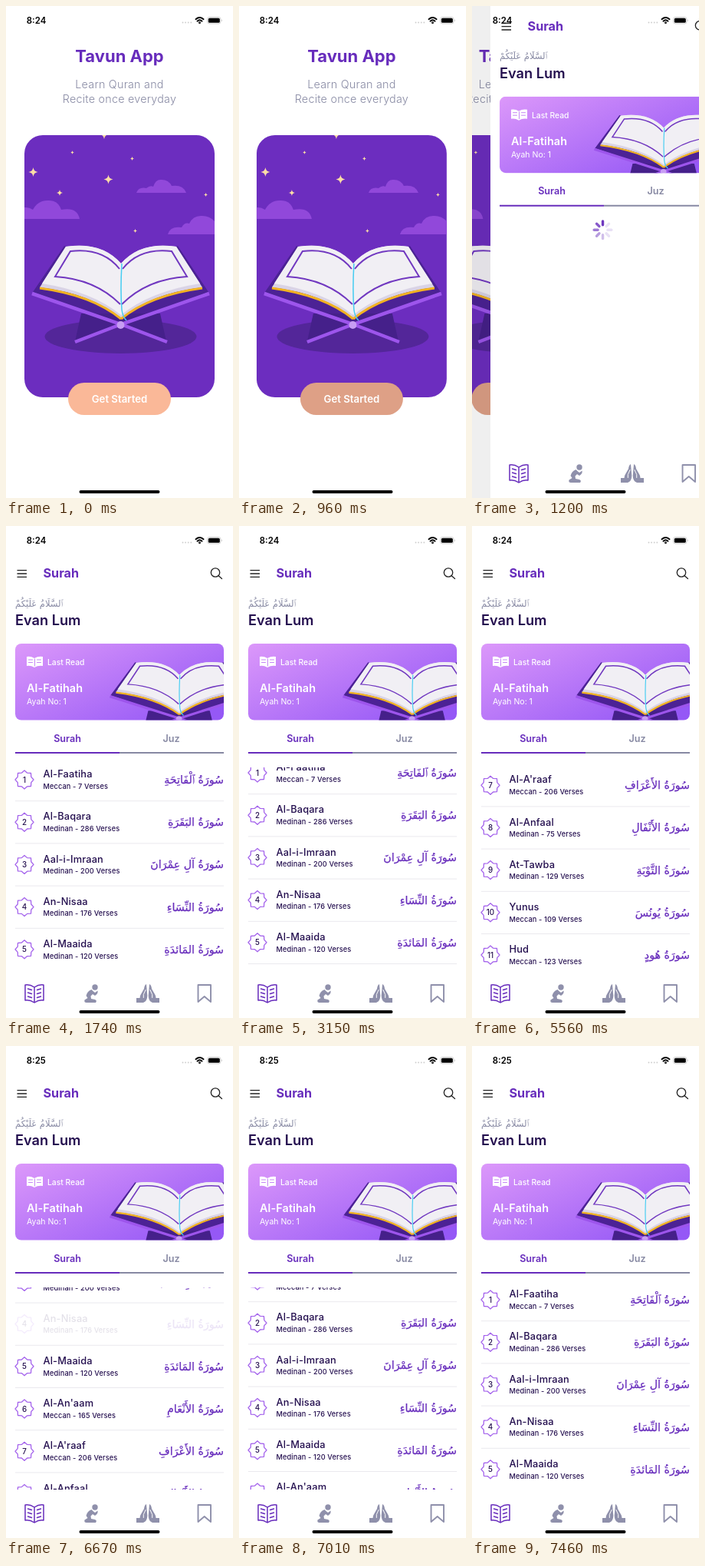
An HTML page that plays this animation: 296x640 px, repeating every 8 s.

```html
<!DOCTYPE html>
<html lang="en">
<head>
<meta charset="utf-8">
<title>Surah reader</title>
<style>
html, body { margin: 0; width: 100%; height: 100%; overflow: hidden; background: #fff; }
svg { display: block; width: 100vw; height: 100vh; }
text { font-family: Inter, "Open Sans", sans-serif; font-weight: 500; fill: #240f4f; }
.ar { font-family: "DejaVu Sans", sans-serif; font-weight: 400; }
.line { fill: none; stroke-linecap: round; stroke-linejoin: round; }
</style>
</head>
<body>
<svg viewBox="0 0 296 640" preserveAspectRatio="none">
  <defs>
    <linearGradient id="lilac" x1="0" y1="0" x2="1" y2=".8">
      <stop offset="0" stop-color="#dc98fa"/><stop offset="1" stop-color="#9558f6"/>
    </linearGradient>
    <clipPath id="posterClip"><rect x="24" y="168" width="248" height="341" rx="24"/></clipPath>
    <clipPath id="bannerClip"><rect x="12" y="153" width="272" height="99.500" rx="8"/></clipPath>
    <clipPath id="listClip"><rect x="0" y="314" width="296" height="263"/></clipPath>
    <g id="half">
      <path d="M78 313Q125 306 150 335V407Q112 374 44 366Z" fill="#d9d3e6"/>
      <path d="M78 313Q125 306 150 335V402Q112 371 47 361Z" fill="#f1eff4"/>
      <path d="M148 342Q126 314 84 319L64 352Q116 355 149 388" fill="none" stroke="#7138c0" stroke-width="2"/>
      <path d="M44 367Q112 376 150 407" fill="none" stroke="#f2b322" stroke-width="3"/>
    </g>
    <g id="book">
      <path d="M35 372L76 312L150 340L224 312L264 372L150 414Z" fill="#4c2295"/>
      <path d="M98 400L90 436L150 414L209 436L201 400Z" fill="#45208a"/>
      <path d="M34 374L150 414L210 437M265 374L150 414L90 437" fill="none" stroke="#9d55ec" stroke-width="4.5"/>
      <use href="#half"/>
      <use href="#half" transform="matrix(-1 0 0 1 300 0)"/>
      <circle cx="149.500" cy="415" r="5" fill="#c79df3"/>
      <path d="M151 335Q149 370 151 395Q152 404 157 409" fill="none" stroke="#45cdf2" stroke-width="1.500"/>
    </g>
    <g id="hand">
      <path d="M183 596Q180.500 597 180 602L176 609Q174.500 611 174.500 614H170V620H179Q184.300 618 184.300 611Z"/>
      <path class="line" d="M182 603.500L179.300 609.500V613.500" stroke="#fff" stroke-width="1"/>
    </g>
  </defs>

  <g id="intro">
    <rect width="296" height="640" fill="#fff"/>
    <text x="148" y="73" font-size="22" text-anchor="middle" style="font-weight:700;fill:#672cbc">Tavun App</text>
    <g font-size="14.300" letter-spacing=".25" text-anchor="middle">
      <text x="148" y="107" style="font-weight:300;fill:#8789a3">Learn Quran and</text>
      <text x="148" y="126" style="font-weight:300;fill:#8789a3">Recite once everyday</text>
    </g>
    <g clip-path="url(#posterClip)">
      <rect x="24" y="168" width="248" height="341" fill="#6c2dbf"/>
      <g fill="#9148da">
        <path d="M170 243Q173 235 183 237Q188 233 192 235Q195 225 203 226Q212 226 216 234Q231 232 235 243Z"/>
        <path d="M20 277V263Q28 260 35 265Q42 252 56 253Q68 253 72 265Q93 261 96 277Z"/>
        <path d="M211 297Q214 286 229 288Q233 281 239 283Q244 272 256 273Q268 273 276 285V297Z"/>
      </g>
      <g id="stars" fill="#fbdca6"></g>
      <ellipse cx="149.500" cy="430" rx="99" ry="22" fill="#532699"/>
      <use href="#book"/>
    </g>
    <rect id="button" x="81" y="490" width="134" height="42" rx="21"/>
    <text x="148" y="516" font-size="13.200" text-anchor="middle" style="font-weight:600;fill:#fff">Get Started</text>
    <rect id="shade" width="296" height="640"/>
  </g>

  <g id="home">
    <rect width="296" height="640" fill="#fff"/>
    <g id="body">
      <path d="M14.500 57.700H27M14.500 62H27M14.500 66.300H27" stroke="#222" stroke-width="1.300"/>
      <text x="48.500" y="67" font-size="16.200" style="font-weight:700;fill:#672cbc">Surah</text>
      <g class="line" stroke="#222" stroke-width="1.300"><circle cx="273" cy="60.500" r="5.700"/><path d="M277.200 64.700L281.500 68.500"/></g>
      <text class="ar" x="12" y="104.500" font-size="11.500" style="fill:#8789a3">ٱلسَّلَامُ عَلَيْكُمْ</text>
      <text x="12" y="129" font-size="18.200" style="font-weight:600">Evan Lum</text>
      <g clip-path="url(#bannerClip)">
        <rect x="12" y="153" width="272" height="100" fill="url(#lilac)"/>
        <use href="#book" transform="translate(226 178) scale(.78 .715) translate(-150 -313)"/>
      </g>
      <path d="M37 172Q32 169 27 170V182Q32 181 37 184Q42 181 48 182V170Q42 169 37 172Z" fill="#fff"/>
      <path class="line" d="M37.500 173V182M29.500 174H34.500M29.500 177.500H34.500M40.500 174H45.500M40.500 177.500H45.500" stroke="#c587f5"/>
      <text x="54" y="181" font-size="10.300" style="fill:#fff">Last Read</text>
      <text x="27" y="216" font-size="14.400" letter-spacing=".1" style="font-weight:600;fill:#fff">Al-Fatihah</text>
      <text x="27" y="232" font-size="10.500" style="font-weight:400;fill:#fff">Ayah No: 1</text>
      <g font-size="12.600" text-anchor="middle">
        <text x="80" y="280.500" style="font-weight:600;fill:#672cbc">Surah</text>
        <text x="215.500" y="280.500" style="font-weight:600;fill:#8789a3">Juz</text>
      </g>
      <path d="M12 295H148" stroke="#672cbc" stroke-width="2"/>
      <path d="M148 295H284" stroke="#8789a3" stroke-width="2"/>
      <g id="spinner" class="line" stroke="#672cbc" stroke-width="3.400"></g>
      <g clip-path="url(#listClip)"><g id="list"></g></g>
    </g>
    <g class="line" stroke="#672cbc" stroke-width="1.500">
      <path d="M37 600Q31 596 25 597V617Q31 616 37 620Q43 616 49 617V597Q43 596 37 600V620"/>
      <path d="M28.500 602L33.500 603.500M28.500 607L33.500 608.500M28.500 612L33.500 613.500M45.500 602L40.500 603.500M45.500 607L40.500 608.500M45.500 612L40.500 613.500"/>
    </g>
    <g fill="#8f90ab">
      <circle cx="116" cy="600" r="3.700"/>
      <path d="M111.500 603Q106 605 104.500 611L106.500 614L102.500 616.500Q101.500 620 105 620H117Q119 617 116 616L111 615L110.500 611.500L113 609L116 611Q120.500 608 119.500 604.500L116 607L113.500 605Z"/>
      <use href="#hand"/>
      <use href="#hand" transform="matrix(-1 0 0 1 370 0)"/>
    </g>
    <path class="line" d="M250.500 597H267V619L258.700 612L250.500 619Z" stroke="#8f90ab" stroke-width="1.900"/>
  </g>

  <text id="clock" x="26.800" y="23" font-size="11.400" style="font-weight:600;fill:#000"></text>
  <path class="line" d="M230.500 21.500H243" stroke="#ccc" stroke-width="1.800" stroke-dasharray="0 3.600"/>
  <g class="line" stroke="#000" stroke-width="1.900" stroke-linecap="butt">
    <path d="M247.500 17.200Q252.500 12.800 257.500 17.200M249.500 19.700Q252.500 17 255.500 19.700"/>
    <circle cx="252.500" cy="21.800" r=".5"/>
  </g>
  <rect x="262.500" y="14.500" width="17.500" height="8.500" rx="2.700" fill="none" stroke="#c4c4c4" stroke-width=".8"/>
  <rect x="263.800" y="15.800" width="15" height="6" rx="1.600"/>
  <path d="M281.300 17.300Q282.700 18.700 281.300 20.300Z" fill="#aaa"/>
  <rect x="95.500" y="630" width="105" height="4" rx="2"/>
</svg>
<script>
const $ = id => document.getElementById(id);
const LOOP = 8000, ROW = 55.2;

const surahs = [
  ["Al-Faatiha", "Meccan", 7, "ٱلْفَاتِحَةِ"],
  ["Al-Baqara", "Medinan", 286, "البَقَرَةِ"],
  ["Aal-i-Imraan", "Medinan", 200, "آلِ عِمْرَانَ"],
  ["An-Nisaa", "Medinan", 176, "النِّسَاءِ"],
  ["Al-Maaida", "Medinan", 120, "المَائدَةِ"],
  ["Al-An'aam", "Meccan", 165, "الأَنْعَامِ"],
  ["Al-A'raaf", "Meccan", 206, "الأَعْرَافِ"],
  ["Al-Anfaal", "Medinan", 75, "الأَنْفَالِ"],
  ["At-Tawba", "Medinan", 129, "التَّوْبَةِ"],
  ["Yunus", "Meccan", 109, "يُونُسَ"],
  ["Hud", "Meccan", 123, "هُودٍ"]
];

// Eight-pointed badge around the origin
const badge = Array.from({ length: 16 }, (_, i) => {
  const r = i % 2 ? 9.5 : 12, a = i * Math.PI / 8;
  return (r * Math.sin(a)).toFixed(2) + "," + (r * Math.cos(a)).toFixed(2);
}).join(" ");

$("list").innerHTML = surahs.map(([name, place, verses, arabic], i) => `
  <g transform="translate(0 ${330 + i * ROW})">
    <g id="row${i + 1}">
      <polygon class="line" points="${badge}" transform="translate(24 0)" stroke="#a463ec" stroke-width="1.3"/>
      <text x="24" y="3.500" font-size="9.800" text-anchor="middle">${i + 1}</text>
      <text x="48.500" y="-2.800" font-size="12.800" letter-spacing=".15">${name}</text>
      <text x="48.500" y="11.800" font-size="9.200" letter-spacing=".13">${place} - ${verses} Verses</text>
      <text class="ar" x="284" y="5" font-size="14.200" text-anchor="end"
        style="fill:#672cbc;stroke:#672cbc;stroke-width:.25">سُورَةُ ${arabic}</text>
    </g>
    <path d="M12 27.700H284" stroke="#e8e7ed" stroke-width=".9"/>
  </g>`).join("");

const star = (x, y, r) =>
  `<path transform="translate(${x} ${y}) scale(${r})" d="M0-1Q.12-.12 1 0Q.12.12 0 1Q-.12.12-1 0Q-.12-.12 0-1Z"/>`;
$("stars").innerHTML = [
  [35.5, 216, 6], [70, 243, 4], [86.5, 190.5, 2.2], [133.5, 225.5, 6],
  [128, 167, 6], [164.5, 198.5, 2.4], [260.5, 245.5, 2.4], [168.5, 292.5, 2.4]
].map(s => star(...s)).join("");

for (let k = 0; k < 8; k++)
  $("spinner").innerHTML += `<path d="M0-6.500V-11.300" transform="translate(146.500 326.500) rotate(${k * 45})"/>`;
const blades = [...$("spinner").children];

// The screen refreshes only at these moments
const span = (from, to, n) => Array.from({ length: n }, (_, i) => from + (to - from) * i / (n - 1));
const ticks = [0, 810, ...span(960, 1440, 5), 1590, 1740, ...span(3150, 3500, 4),
  ...span(4790, 5240, 5), ...span(5560, 5880, 4), ...span(6670, 7460, 8)];
const snap = t => ticks.filter(k => k <= t + 0.01).pop();

const clamp = v => Math.min(1, Math.max(0, v));
const easeOut = u => 1 - (1 - u) ** 3;

// Scroll flicks: start, end, offset at start, offset at end
const flicks = [[3150, 3500, 9, 209], [4790, 5240, 209, 328], [5560, 5880, 324, 136], [6670, 7460, 134, 0]];
function scroll(t) {
  const f = flicks.filter(f => f[0] <= t).pop();
  if (!f) return 0;
  const [t0, t1, a, b] = f;
  return a + (b - a) * easeOut(clamp((t - t0) / (t1 - t0)));
}

// Critically damped spring for the page push
function push(t) {
  if (t >= 1590) return 1;
  const x = Math.max(0, t - 950) * 0.0166;
  return 1 - (1 + x) * Math.exp(-x);
}

const touch = (t, at) => t < at ? 1 : 0.12 + 0.88 * clamp((t - at) / 250);
const move = (id, x, y) => $(id).setAttribute("transform", `translate(${x.toFixed(2)} ${y.toFixed(2)})`);

function draw(now) {
  const t = snap(now), p = push(t), ready = t >= 1590;
  move("intro", -88.8 * p, 0);
  move("home", 296 * (1 - p), 0);
  move("body", 0, ready ? 0 : -35.3);
  move("list", 0, -scroll(t));
  $("shade").setAttribute("fill-opacity", 0.07 * p);
  $("button").setAttribute("fill", t < 810 ? "#fab898" : "#dea086");
  $("list").style.display = ready ? "" : "none";
  $("spinner").style.display = ready ? "none" : "";
  const head = Math.floor(t / 100) + 4;
  blades.forEach((b, k) => b.setAttribute("opacity", Math.max(0.15, 0.95 - 0.16 * ((head - k) % 8))));
  $("row8").setAttribute("opacity", touch(t, 4790));
  $("row4").setAttribute("opacity", touch(t, 6670));
  $("clock").textContent = t < 6670 ? "8:24" : "8:25";
}

const start = performance.now();
function loop() {
  draw((performance.now() - start) % LOOP);
  requestAnimationFrame(loop);
}
loop();
</script>
</body>
</html>
```
